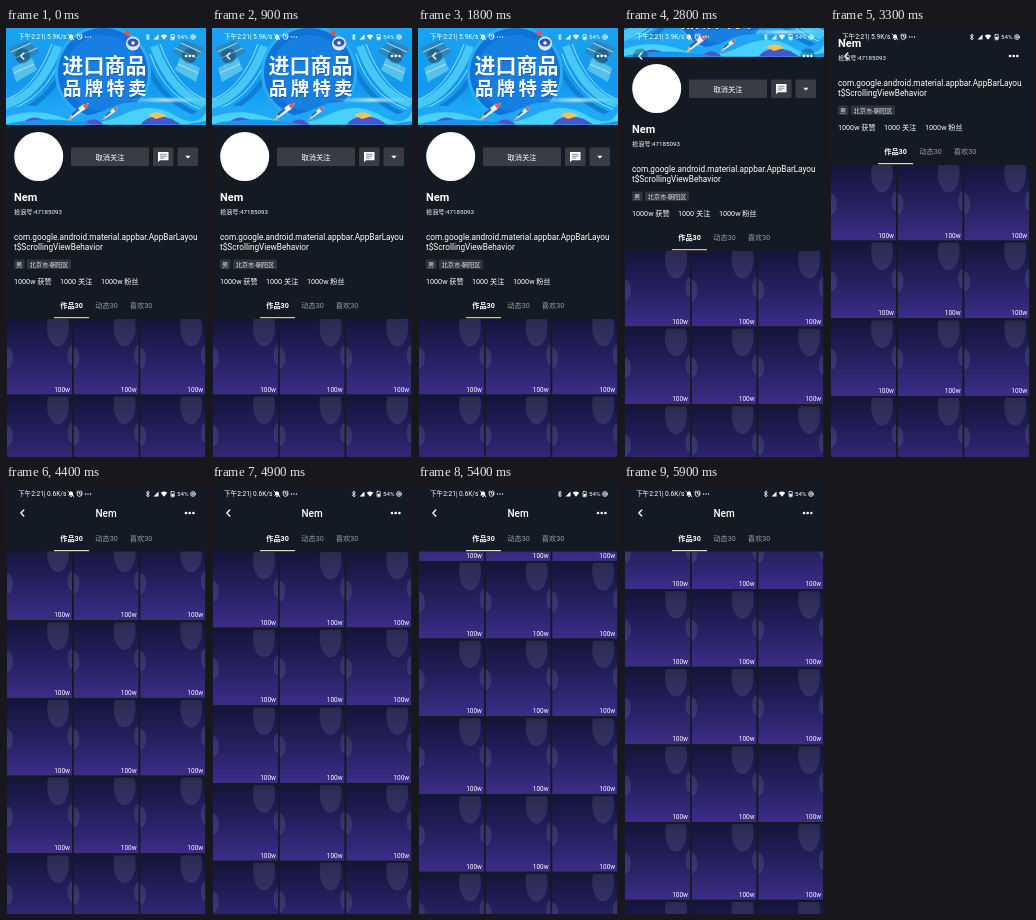
Recreate the animation shown at these times as an HTML page. Size 200 by 429 pixels, loop 6000 ms.

```html
<!DOCTYPE html>
<html lang="zh-CN">
<head>
<meta charset="utf-8">
<title>Profile scroll</title>
<style>
html, body { margin: 0; width: 100%; height: 100%; overflow: hidden; background: #141a23; }
svg { display: block; width: 100%; height: 100%; font-family: Roboto, "Noto Sans CJK SC", "Noto Sans CJK", sans-serif; fill: #fff; }
.mid { text-anchor: middle; }
.line { fill: none; stroke: #fff; stroke-linecap: round; stroke-linejoin: round; }
</style>
</head>
<body>
<svg viewBox="0 0 200 429">
  <defs>
    <linearGradient id="tileFill" x1="0" y1="0" x2="0" y2="1">
      <stop offset="0" stop-color="#13153b"/>
      <stop offset=".5" stop-color="#25205f"/>
      <stop offset="1" stop-color="#3c2d88"/>
    </linearGradient>
    <linearGradient id="sky" x1="0" y1="0" x2="0" y2="1">
      <stop offset="0" stop-color="#1aa3f0"/>
      <stop offset=".6" stop-color="#1398f0"/>
      <stop offset="1" stop-color="#22b4fa"/>
    </linearGradient>
    <radialGradient id="flare">
      <stop offset="0" stop-color="#fff" stop-opacity=".8"/>
      <stop offset="1" stop-color="#8fe6ff" stop-opacity="0"/>
    </radialGradient>
    <clipPath id="tileClip"><rect width="65" height="75.5"/></clipPath>
    <clipPath id="bannerClip"><rect width="200" height="96.5"/></clipPath>
    <g id="tile">
      <g clip-path="url(#tileClip)">
        <rect width="65" height="75.5" fill="url(#tileFill)"/>
        <g fill="#8d8bb4" fill-opacity=".19">
          <ellipse cx="51" cy="8" rx="11" ry="19.5"/>
          <ellipse cx="0" cy="39" rx="6" ry="10.5"/>
          <ellipse cx="65" cy="36" rx="4.5" ry="10"/>
        </g>
      </g>
      <text x="63" y="72.5" font-size="6.5" text-anchor="end">100w</text>
    </g>
    <g id="rocket">
      <path d="M-13 3L-8-2L8-3L15 0L8 3L-8 3Z" fill="#e9f6ff"/>
      <path d="M8-3L15 0L8 3Z" fill="#e8604c"/>
      <path d="M-8-2L2-2.6L2 0L-9 1Z" fill="#2b5fc4"/>
      <path d="M-9 0L-17 2L-9 3Z" fill="#f5b13d"/>
    </g>
    <!-- slanted ribbons on one side of the banner -->
    <g id="ribbons" fill="none">
      <path d="M-4 78Q34 68 52 18" stroke="#47c8f4" stroke-width="8"/>
      <path d="M-4 90Q44 78 60 34" stroke="#0f7fd6" stroke-width="5"/>
      <path d="M-4 84Q40 73 56 26M-4 73Q28 64 46 16" stroke="#a4ecfd" stroke-width=".9"/>
      <path d="M2 20L22 12L34 24L14 36Z" fill="#2f86b8"/>
      <path d="M6 40L26 30L31 42L10 54Z" fill="#56c2ea"/>
      <path d="M5 24L25 15M9 30L31 20M8 45L28 36" stroke="#b9e8f6" stroke-width=".9"/>
    </g>
  </defs>

  <rect width="200" height="429" fill="#141a23"/>
  <g id="grid"></g>

  <g id="head">
    <rect width="200" height="290.5" fill="#141a23"/>
    <g clip-path="url(#bannerClip)">
      <rect width="200" height="97" fill="url(#sky)"/>
      <use href="#ribbons"/>
      <use href="#ribbons" transform="translate(200 0) scale(-1 1)"/>
      <circle cx="97" cy="45" r="48" fill="#2aaef2"/>
      <circle cx="97" cy="45" r="45" fill="#0f72d8"/>
      <circle cx="97" cy="45" r="38" fill="#1580e2"/>
      <path d="M0 82Q22 73 50 83T104 80T156 82T200 76V97H0Z" fill="#1fa6f6"/>
      <path d="M0 89Q28 79 58 90T116 87T168 87T200 84V97H0Z" fill="#48d2fb"/>
      <path d="M14 97Q24 86 36 91T54 97Z" fill="#5b4fc4"/>
      <path d="M76 97Q88 86 98 97Z" fill="#5b4fc4"/>
      <path d="M134 97Q144 84 166 91L176 97Z" fill="#4a55cc"/>
      <path d="M142 87Q152 81 160 88L150 91Z" fill="#f0c451"/>
      <path d="M0 96Q42 87 88 96T200 93V97H0Z" fill="#1597ec"/>
      <ellipse cx="160" cy="72" rx="40" ry="3.5" fill="url(#flare)"/>
      <circle cx="121" cy="5" r="2.600" fill="#e2543f"/>
      <circle cx="127" cy="15.500" r="7" fill="#dfeaff"/>
      <ellipse cx="127" cy="14.500" rx="5.500" ry="4" fill="#3450bd"/>
      <circle cx="127" cy="15" r="1.800"/>
      <use href="#rocket" transform="translate(72 83) rotate(-35) scale(.9)"/>
      <use href="#rocket" transform="translate(104 85) rotate(-35) scale(.65)"/>
      <g font-weight="900">
        <g fill="#0d5fbe"><text x="57" y="46" font-size="21">进口商品</text><text x="57.500" y="67.800" font-size="18.500" letter-spacing="3.200">品牌特卖</text></g>
        <text x="56.500" y="45" font-size="21">进口商品</text>
        <text x="57" y="66.800" font-size="18.500" letter-spacing="3.200">品牌特卖</text>
      </g>
    </g>

    <circle cx="32.700" cy="128.500" r="24.500"/>
    <g fill="#393c45">
      <rect x="65" y="119.500" width="78" height="18.500" rx="1"/>
      <rect x="147" y="119.500" width="20.500" height="18.500" rx="1"/>
      <rect x="171.500" y="119.500" width="20.500" height="18.500" rx="1"/>
    </g>
    <text class="mid" x="104" y="131.500" font-size="7.300">取消关注</text>
    <path d="M152 124H162.500V132.300H154L152 134.300Z"/>
    <path d="M154 126.300H160.500M154 128.200H160.500M154 130.100H158.500" stroke="#393c45" stroke-width=".6"/>
    <path d="M179.200 127.700H184.600L181.900 130.500Z"/>

    <text x="8" y="173" font-size="11" font-weight="700">Nem</text>
    <text x="8" y="185.500" font-size="6.200">拾浪号:47185093</text>
    <g font-size="8.220">
      <text x="8" y="212">com.google.android.material.appbar.AppBarLayou</text>
      <text x="8" y="222">t$ScrollingViewBehavior</text>
    </g>
    <g fill="#2f343d">
      <rect x="8" y="231.500" width="10.500" height="9.500" rx="1"/>
      <rect x="21" y="231.500" width="44" height="9.500" rx="1"/>
    </g>
    <g font-size="6.200" class="mid" fill="#e4e4e8">
      <text x="13.200" y="238.600">男</text>
      <text x="43" y="238.600">北京市-朝阳区</text>
    </g>
    <g font-size="7.200">
      <text x="8" y="256">1000w 获赞</text>
      <text x="54" y="256">1000 关注</text>
      <text x="95" y="256">1000w 粉丝</text>
    </g>
    <g font-size="7.200" class="mid">
      <text x="65.500" y="280.200" font-weight="700">作品30</text>
      <g fill="#9a9ba3"><text x="100.500" y="280.200">动态30</text><text x="135" y="280.200">喜欢30</text></g>
    </g>
    <rect id="mark" x="48" y="289" width="35" height="1.200"/>
  </g>

  <g id="bar">
    <rect width="200" height="44" fill="#141a23"/>
    <text class="mid" x="100" y="31.800" font-size="10" font-weight="500">Nem</text>
  </g>

  <g id="discs" fill="#10283f" fill-opacity=".35">
    <circle cx="16.500" cy="28" r="7.500"/><circle cx="183.500" cy="28" r="7.500"/>
  </g>
  <path class="line" d="M17.800 25L14.800 28L17.800 31" stroke-width="1.300"/>
  <g><circle cx="180" cy="28" r="1.300"/><circle cx="183.700" cy="28" r="1.300"/><circle cx="187.400" cy="28" r="1.300"/></g>

  <g font-size="6.600">
    <text x="12" y="11.300">下午2:21|</text>
    <text id="speed" x="41" y="11.300"></text>
    <text x="171" y="11.300" font-size="6.200">54%</text>
  </g>
  <path d="M62 10.500L63 9.500V7.800Q65 4.500 67 7.800V9.500L68 10.500ZM64 11H66V11.800H64Z"/>
  <g class="line" stroke-width=".8">
    <path d="M62 6L68 12"/>
    <circle cx="73.500" cy="9" r="2.400"/>
    <path d="M73.500 7.600V9L74.500 9.600M70.700 7L72 5.800M76.300 7L75 5.800"/>
    <path d="M140.300 7.500L143.300 10.500L141.800 12V6L143.300 7.500L140.300 10.500"/>
    <circle cx="187" cy="9" r="2.400"/>
    <path d="M187 7.700V10.300M185.700 9H188.300"/>
  </g>
  <path d="M147.500 11.500L152.500 6.500V11.500ZM154.800 7.800Q158 5 161.200 7.800L158 11.700Z"/>
  <rect x="165" y="6.500" width="3.300" height="5.300" rx=".5" class="line" stroke-width=".7"/>
  <rect x="165.500" y="8.800" width="2.300" height="2.600"/>
  <g><circle cx="79.500" cy="9" r=".7"/><circle cx="82" cy="9" r=".7"/><circle cx="84.500" cy="9" r=".7"/></g>
</svg>
<script>
const LOOP = 6000, STEP = 100, PINNED = 224;
const ROWS = 10, COL_GAP = 66.6, ROW_GAP = 77.7;
// [time, scroll distance] along the drag
const path = [[2000, 0], [2400, 14], [2800, 68], [3300, 154],
              [4400, 309], [5400, 446], [5900, 495.6]];

const el = id => document.getElementById(id);
const clamp = (v, lo, hi) => Math.min(hi, Math.max(lo, v));

let tiles = '';
for (let i = 0; i < ROWS * 3; i++) {
  const x = 1 + (i % 3) * COL_GAP;
  const y = 291 + Math.floor(i / 3) * ROW_GAP;
  tiles += `<use href="#tile" x="${x}" y="${y}"/>`;
}
el('grid').innerHTML = tiles;

function slope(i) {
  if (i === 0) return 0;
  const a = path[i - 1], b = path[Math.min(i + 1, path.length - 1)];
  return (b[1] - a[1]) / (b[0] - a[0]);
}

// Smooth Hermite curve through the drag points
function scrollAt(t) {
  if (t <= path[0][0]) return 0;
  const last = path.length - 1;
  if (t >= path[last][0]) return path[last][1];
  let i = 0;
  while (path[i + 1][0] <= t) i++;
  const [t0, s0] = path[i], [t1, s1] = path[i + 1];
  const d = t1 - t0, u = (t - t0) / d, v = 1 - u;
  return s0 * (1 + 2 * u) * v * v + slope(i) * d * u * v * v
       + s1 * u * u * (3 - 2 * u) - slope(i + 1) * d * u * u * v;
}

function draw(t) {
  const s = scrollAt(t);
  const up = Math.min(s, PINNED);
  el('grid').setAttribute('transform', `translate(0 ${-s})`);
  el('head').setAttribute('transform', `translate(0 ${-up})`);
  el('bar').setAttribute('opacity', clamp((s - 165) / (PINNED - 165), 0, 1));
  el('discs').setAttribute('opacity', clamp((110 - s) / 40, 0, 1));
  el('mark').setAttribute('fill', s < 120 ? '#edc83e' : '#dedbb8');
  el('speed').textContent = t < 3800 ? '5.9K/s' : '0.6K/s';
}

const start = performance.now();
function tick() {
  const t = (performance.now() - start) % LOOP;
  draw(Math.floor(t / STEP) * STEP);
  requestAnimationFrame(tick);
}
draw(0);
requestAnimationFrame(tick);
</script>
</body>
</html>
```
